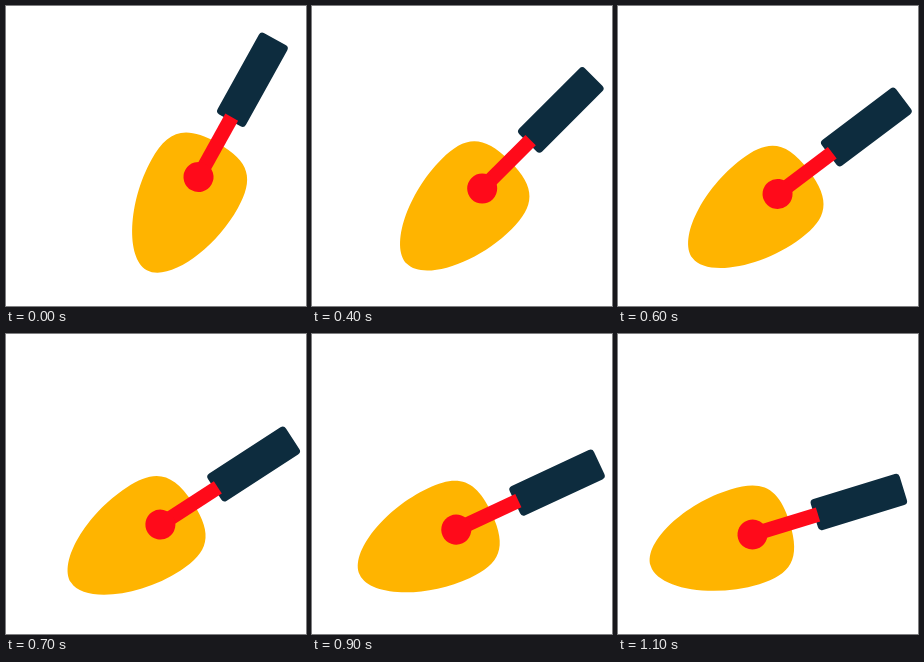
An HTML page that plays this animation: 300 px wide and 300 px high, repeating every 1200 ms.

```html
<!DOCTYPE html>
<html lang="en">
<head>
<meta charset="utf-8">
<title>Swinging trowel</title>
<style>
  html, body { margin: 0; width: 100%; height: 100%; overflow: hidden; background: #fff; }
  svg { display: block; width: 100%; height: 100%; }
</style>
</head>
<body>
<svg viewBox="0 0 300 300">
  <!-- Drawn along the x axis, with the joint at the origin -->
  <g id="trowel">
    <path fill="#ffb400" d="M-106.5 0C-106.5 24.5 -56 49.5 -8 49.5C25 49.5 39 38 39 0C39 -38 25 -49.5 -8 -49.5C-56 -49.5 -106.5 -24.5 -106.5 0Z"/>
    <rect fill="#0d2c3e" x="64.7" y="-16.2" width="93" height="32.4" rx="4"/>
    <g fill="#ff0a1a">
      <rect y="-7.3" width="68.5" height="14.6"/>
      <circle r="15"/>
    </g>
  </g>
</svg>
<script>
  const STEP_MS = 100;
  const STEPS = 12;
  const trowel = document.getElementById('trowel');

  function render(time) {
    const k = Math.floor(time / STEP_MS) % STEPS;
    const x = 192.5 - 5.75 * k + 0.0434 * k * k;
    const y = 171 + 3 * k - 0.029 * k * k;
    const angle = 4 * k - 61;
    trowel.setAttribute('transform', `translate(${x} ${y}) rotate(${angle})`);
  }

  const start = performance.now();
  function tick() {
    render(performance.now() - start);
    requestAnimationFrame(tick);
  }
  tick();
</script>
</body>
</html>
```
